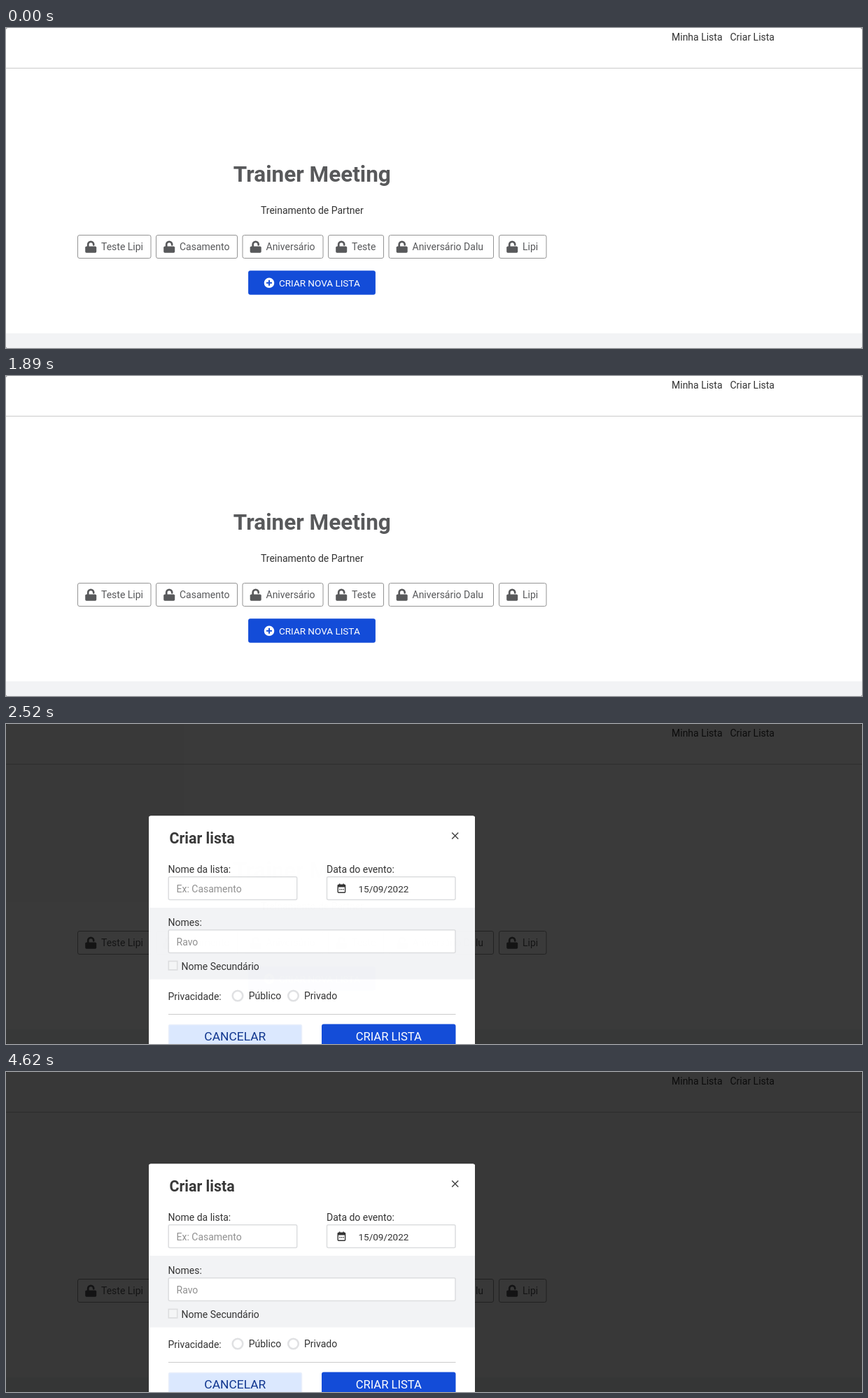
An HTML page that plays this animation: 1223x458 px, repeating every 4.76 s.

```html
<!DOCTYPE html>
<html lang="pt-BR">
<head>
<meta charset="utf-8">
<title>Criar lista</title>
<style>
  html, body { margin: 0; width: 100%; height: 100%; overflow: hidden; background: #8a8a8a; }
  svg { display: block; width: 100vw; height: 100vh; }
  text { font: 14px Roboto, sans-serif; fill: #333; white-space: pre; }
  .mid { text-anchor: middle; }
  .title { font-size: 31.5px; font-weight: 700; fill: #58595b; }
  .chip text { fill: #58595b; }
  .chip .box { fill: #fff; stroke: #949494; }
  .lock rect { fill: #58595b; }
  .lock path { fill: none; stroke: #58595b; stroke-width: 2.7; stroke-linecap: round; }
  .blue { fill: #134cd8; }
  .field { fill: #fff; stroke: #dcdddf; stroke-width: 1.5; }
  .hint { fill: #919191; }
  .band { fill: #f2f3f5; }
  .ring { fill: #fff; stroke: #e0e1e3; stroke-width: 2.6; }
  #modal { opacity: 0; }
</style>
</head>
<body>
<svg viewBox="0 0 1223 458">
  <rect width="1223" height="458" rx="3" fill="#fff"/>
  <path d="M0 437H1223V455a3 3 0 0 1-3 3H3a3 3 0 0 1-3-3z" class="band"/>
  <path d="M0 57.5H1223" stroke="#cacaca"/>
  <text x="951" y="18">Minha Lista</text>
  <text x="1034.5" y="18">Criar Lista</text>

  <text class="title mid" x="437.3" y="220">Trainer Meeting</text>
  <text class="mid" x="437.3" y="266">Treinamento de Partner</text>
  <g id="chips"></g>

  <rect class="blue" x="346.1" y="347.2" width="181.8" height="34.6" rx="3"/>
  <circle cx="376" cy="364.8" r="7.3" fill="#fff"/>
  <path d="M372 364.8h8M376 360.8v8" stroke="#134cd8" stroke-width="2"/>
  <text x="390" y="370" style="font-size:13.5px;fill:#fff">CRIAR NOVA LISTA</text>

  <g id="modal">
    <!-- The shade leaves the dialog area open, so the page shows through it undimmed while fading. -->
    <path d="M0 0H1223V458H0zM207 131.5H667a3 3 0 0 1 3 3V458H204V134.5a3 3 0 0 1 3-3z"
          fill-rule="evenodd" fill-opacity=".78"/>
    <path d="M207 131.5H667a3 3 0 0 1 3 3V458H204V134.5a3 3 0 0 1 3-3z" fill="#fff"/>
    <text x="233.5" y="171" style="font-size:21.4px;font-weight:700;fill:#383838">Criar lista</text>
    <path d="M637.2 155.5l9 9m0-9l-9 9" stroke="#444" stroke-width="1.5"/>

    <text x="231.5" y="213">Nome da lista:</text>
    <rect class="field" x="232.2" y="218.7" width="183.5" height="32.8" rx="2"/>
    <text class="hint" x="243.5" y="240.5">Ex: Casamento</text>

    <text x="458" y="213">Data do evento:</text>
    <rect class="field" x="458.5" y="218.7" width="183.5" height="32.8" rx="2"/>
    <g fill="none" stroke="#333" stroke-width="1.4">
      <rect x="474.2" y="230.2" width="10.4" height="11" rx="1"/>
      <path d="M474 232h11" stroke-width="3"/>
      <path d="M476.7 228.5v2m5.4-2v2"/>
      <path d="M476.3 236.7h6.4" stroke-dasharray="1.4 1.1"/>
    </g>
    <text x="503.5" y="240.5" style="font-size:13.5px">15/09/2022</text>

    <rect class="band" x="204" y="263" width="466" height="102.5"/>
    <text x="231.5" y="289">Nomes:</text>
    <rect class="field" x="232.2" y="294.7" width="409.8" height="32.8" rx="2"/>
    <text class="hint" x="243.5" y="316.5">Ravo</text>
    <rect x="232.3" y="339.5" width="12.4" height="12.4" fill="#f4f5f6" stroke="#dcdddf" stroke-width="1.6"/>
    <text x="250.5" y="352">Nome Secundário</text>

    <text x="231.5" y="395">Privacidade:</text>
    <circle class="ring" cx="331" cy="389" r="7.3"/>
    <text x="346.7" y="393.5">Público</text>
    <circle class="ring" cx="410.5" cy="389" r="7.3"/>
    <text x="426" y="393.5">Privado</text>
    <path d="M232 415.5H642.5" stroke="#cbcbcb"/>

    <rect x="232.5" y="430.5" width="190" height="34" rx="2" fill="#dbe8fe" stroke="#e9effa" stroke-width="1.5"/>
    <text class="mid" x="327.3" y="453" style="font-size:17.4px;fill:#10368f">CANCELAR</text>
    <rect class="blue" x="451" y="429.5" width="191.5" height="36" rx="3"/>
    <text class="mid" x="546.8" y="453" style="font-size:16.6px;fill:#fff">CRIAR LISTA</text>
  </g>
</svg>
<script>
  const LOOP = 4760;

  // left edge, width, label
  const chips = [
    [102.5, 104.5, 'Teste Lipi'],
    [214.5, 116, 'Casamento'],
    [338, 115, 'Aniversário'],
    [460.5, 79, 'Teste'],
    [547, 149.5, 'Aniversário Dalu'],
    [704.5, 67.5, 'Lipi'],
  ];

  document.getElementById('chips').innerHTML = chips.map(([x, width, label]) => `
    <g class="chip" transform="translate(${x} 296.5)">
      <rect class="box" width="${width}" height="33" rx="2.5"/>
      <g class="lock" transform="translate(10.7 8)">
        <rect y="8" width="16" height="9.2" rx="1.7"/>
        <path d="M4 9V5.3a4 4 0 0 1 8 0v.5"/>
      </g>
      <text x="33.5" y="21.5">${label}</text>
    </g>`).join('');

  // time in ms, opacity held until the next step
  const fade = [
    [0, 0], [2240, .48], [2310, .825], [2380, .94],
    [2450, .98], [2520, .995], [2590, 1], [LOOP, 1],
  ];

  document.getElementById('modal').animate(
    fade.map(([time, opacity]) => ({ offset: time / LOOP, opacity, easing: 'steps(1, end)' })),
    { duration: LOOP, iterations: Infinity }
  );
</script>
</body>
</html>
```
